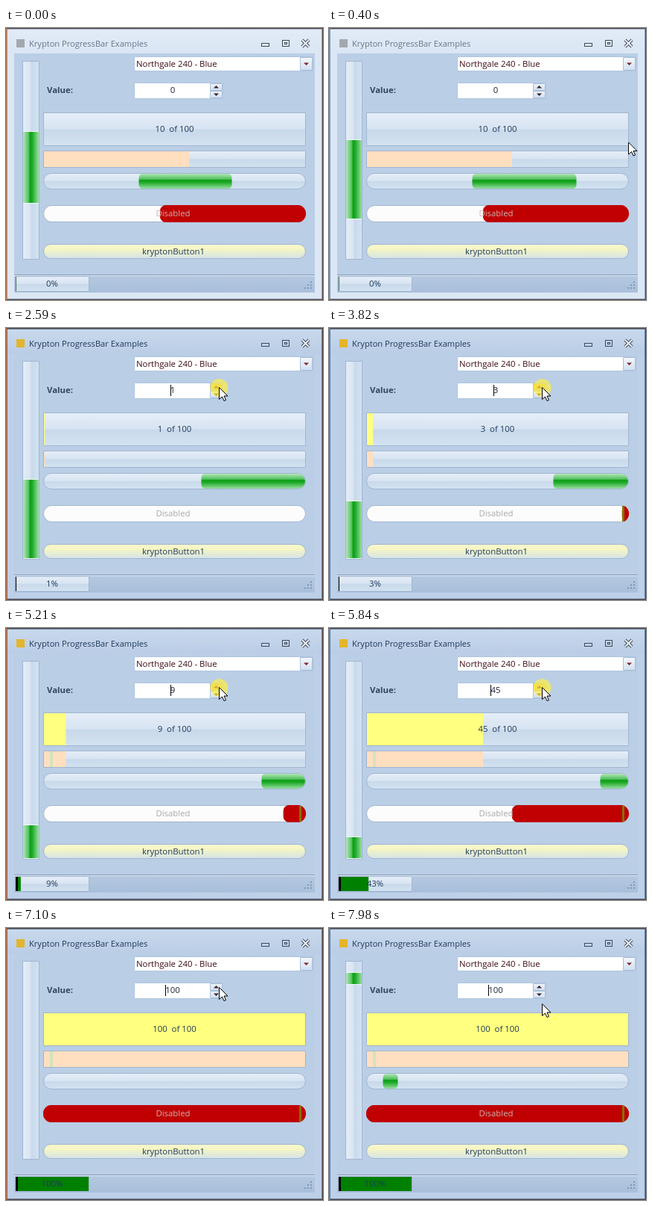
An HTML page with a canvas that plays this animation: 426x364 px, repeating every 8000 ms.

```html
<!DOCTYPE html>
<html lang="en">
<head>
<meta charset="utf-8">
<title>ProgressBar Examples</title>
<style>
html, body { margin: 0; width: 100%; height: 100%; overflow: hidden; }
canvas { display: block; }
</style>
</head>
<body>
<canvas id="stage" width="426" height="364"></canvas>
<script>
const ctx = document.getElementById('stage').getContext('2d');
const LOOP = 8000, PRESS = 2450, RELEASE = 6850;
const FONT = '"Open Sans", "Noto Sans", sans-serif';
const INK = '#1e395b', EDGE = '#a0b6d0';
const GLASS = [[0, '#e6eef8'], [.48, '#d8e4f2'], [.52, '#c8d9eb'], [1, '#d3e3f1']];
const GREEN = [[0, '#c0ecc4'], [.38, '#50c05c'], [.44, '#0e9e18'], [.56, '#18a824'], [1, '#a8e4ae']];

// piecewise linear value of [time, value] points
function track(points, t) {
  if (t <= points[0][0]) return points[0][1];
  for (let i = 1; i < points.length; i++) {
    const [t0, v0] = points[i - 1], [t1, v1] = points[i];
    if (t < t1) return v0 + (v1 - v0) * (t - t0) / (t1 - t0);
  }
  return points[points.length - 1][1];
}

const COUNT = [[PRESS - 1, 0], [PRESS, 1], [3100, 2], [3700, 3], [4250, 4.4], [5180, 9], [5250, 9.2], [6470, 83.5], [6760, 100]];
const MOUSE_X = [[250, 428], [820, 330], [1240, 290], [1700, 286]];
const MOUSE_Y = [[250, 170], [820, 104], [1240, 84], [1500, 76], [1700, 79], [7100, 79], [7700, 101]];
const countAt = t => Math.floor(track(COUNT, t));

function gradient(x, y, w, h, stops, across) {
  const g = across ? ctx.createLinearGradient(x, 0, x + w, 0) : ctx.createLinearGradient(0, y, 0, y + h);
  stops.forEach((s, i) => Array.isArray(s) ? g.addColorStop(...s) : g.addColorStop(i / (stops.length - 1), s));
  return g;
}

function box(x, y, w, h, fill, line, r = 0) {
  ctx.beginPath();
  ctx.roundRect(x + .5, y + .5, w - 1, h - 1, r);
  ctx.fillStyle = fill;
  ctx.fill();
  if (line) { ctx.strokeStyle = line; ctx.stroke(); }
}

function rect(x, y, w, h, fill) {
  ctx.fillStyle = fill;
  ctx.fillRect(x, y, w, h);
}

function text(s, x, y, color = INK, align = 'center', font = '11.4px') {
  ctx.font = `${font} ${FONT}`;
  ctx.textAlign = align;
  ctx.fillStyle = color;
  ctx.fillText(s, x, y);
}

function shape(points, fill, line) {
  ctx.beginPath();
  points.forEach(([x, y]) => ctx.lineTo(x, y));
  ctx.closePath();
  ctx.fillStyle = fill;
  ctx.fill();
  if (line) { ctx.strokeStyle = line; ctx.stroke(); }
}

function arrow(x, y, dir, color) {
  shape([[x - 3.5, y - 1.5 * dir], [x + 3.5, y - 1.5 * dir], [x, y + 2 * dir]], color);
}

// draw clipped to a rounded box
function inside(x, y, w, h, r, draw) {
  ctx.save();
  ctx.beginPath();
  ctx.roundRect(x, y, w, h, r);
  ctx.clip();
  draw();
  ctx.restore();
}

function windowFrame(active) {
  rect(0, 0, 426, 364, '#5c463a');
  rect(0, 0, 1, 364, '#c86c34');
  box(1, 1, 424, 362, active ? '#bdd0e8' : '#dce7f4', active ? '#5f7da5' : '#8ba5c4');
  rect(2, 2, 422, 32, gradient(0, 2, 0, 32, active ? ['#c9d9ec', '#bacde6'] : ['#e2ebf6', '#dae6f4']));
  rect(11, 34, 404, 320, '#bacee6');
  rect(14, 15, 11, 11, active ? '#e3b52c' : '#a3a8ae');
  text('Krypton ProgressBar Examples', 31, 25, active ? INK : '#66768c', 'left', '11.1px');

  ctx.strokeStyle = '#3f4a5c';
  ctx.strokeRect(343.5, 20.5, 10, 4);
  ctx.strokeRect(371.5, 16.5, 9, 8);
  ctx.strokeRect(374.5, 19.5, 3, 2);
  for (const [w, c] of [[4, '#3f4a5c'], [2, '#eef4fa']]) {
    ctx.lineWidth = w;
    ctx.strokeStyle = c;
    ctx.beginPath();
    ctx.moveTo(398, 16); ctx.lineTo(407, 25);
    ctx.moveTo(407, 16); ctx.lineTo(398, 25);
    ctx.stroke();
  }
  ctx.lineWidth = 1;
}

function inputs(count, pressed) {
  box(172, 38, 241, 20, '#fff', '#b1c5df');
  text('Northgale 240 - Blue', 175, 52, '#3c0c14', 'left');
  box(395, 39, 17, 18, gradient(0, 39, 0, 18, ['#f4f8fc', '#cfdff0']), '#a9bfd9');
  arrow(403.5, 48, 1, '#7c2430');

  text('Value:', 55, 87, '#32465e', 'left', 'bold 11.4px');
  box(172, 73, 120, 22, '#fff', '#b1c5df');
  text(count, 224, 87, '#1a2438');
  if (count) rect(Math.round(224 - ctx.measureText(count).width / 2), 76, 1, 15, '#000');
  for (const [y, dir] of [[74, -1], [84, 1]]) {
    const fill = pressed && dir < 0 ? '#e0c050' : gradient(0, y, 0, 10, ['#eff4fa', '#cfddee']);
    box(274, y, 17, 10, fill, '#a9bfd9');
    arrow(282.5, y + 5, dir, '#3a2028');
  }
}

function bars(count, t) {
  const started = count > 0;
  const span = count >= 100 ? 352 : Math.max(0, count * 3.52 - 2.3);
  const fill = started ? span : 195;

  box(50, 113, 353, 45, gradient(0, 113, 0, 45, GLASS), EDGE);
  if (started) rect(51, 114, Math.min(span, 351), 43, '#ffff80');
  text(`${started ? count : 10}  of 100`, 226.5, 139);

  box(50, 164, 353, 23, gradient(0, 164, 0, 23, GLASS), EDGE);
  rect(51, 165, Math.min(fill, 351), 21, '#ffdfbf');
  if (t > 4600) rect(59, 165, 4, 21, '#d3e3bd');

  box(50, 237, 353, 23, '#fcfcfc', EDGE, 11);
  inside(50, 237, 353, 23, 11, () => {
    if (fill > 1.5) box(402 - fill, 237, fill + 8, 23, '#c00000', '#c00000', 7);
    if (t > 3700) rect(394, 238, 3, 21, '#857000');
  });
  text('Disabled', 224.5, 252, fill > 176 ? '#cdb0ae' : '#a9a9a9');

  box(50, 289, 353, 20, gradient(0, 289, 0, 20, ['#f8f8cc', '#f6f6c4', '#e4ecd6', '#d3e2ea']), EDGE, 10);
  text('kryptonButton1', 225, 303);
}

// the tail runs at the marquee value, the head at twice that value
function marquees(t) {
  const step = Math.floor(36.9 + t / 112) % 102;
  const tail = Math.min(1, step / 100), head = Math.min(1, step / 50);
  const left = Math.round(51 + 352 * tail), right = Math.round(51 + 352 * head);
  const top = Math.round(44 + 265 * tail), bottom = Math.round(44 + 265 * head);
  const visible = head > tail;

  box(50, 194, 353, 22, gradient(0, 194, 0, 22, GLASS), EDGE, 11);
  box(22, 44, 23, 266, gradient(22, 0, 23, 0, GLASS, true), EDGE);
  if (!visible) return;
  inside(51, 195, 351, 20, 10, () =>
    box(left, 194, right - left, 22, gradient(0, 194, 0, 22, GREEN), null, 6));
  rect(23, top - 1, 21, bottom - top + 1, '#eef6f4');
  rect(23, top, 21, bottom - top - 1, gradient(22, 0, 23, 0, GREEN, true));
}

function statusBar(count) {
  rect(11, 330, 404, 1, '#8199b8');
  rect(11, 331, 404, 1, '#e4edf7');
  rect(11, 332, 404, 22, gradient(0, 332, 0, 22, ['#b4c8e0', '#a9bfda']));
  box(12, 332, 100, 21, gradient(0, 332, 0, 21, GLASS), EDGE);
  rect(13, 333, count < 100 ? Math.max(0, .98 * count - 2) : 98, 19, '#008000');
  rect(13, 333, count > 4 ? 3 : 1, 19, count ? '#000' : '#4a7a5c');
  text(`${count}%`, 62, 346);
  for (let i = 0; i < 3; i++)
    for (let j = 0; j <= i; j++) rect(409 - 4 * j, 339 + 4 * i, 2, 2, '#8099b8');
}

function pointer(t, pressed) {
  const x = track(MOUSE_X, t), y = track(MOUSE_Y, t);
  if (pressed) {
    ctx.beginPath();
    ctx.arc(x + .5, y + 1, 12, 0, 7);
    ctx.fillStyle = 'rgba(255,238,70,.7)';
    ctx.fill();
  }
  const outline = [[0, 0], [0, 16], [4, 12.5], [6.5, 18], [9, 17], [6.5, 11.5], [11.5, 11.5]];
  shape(outline.map(([a, b]) => [x + .5 + a, y + .5 + b]), '#fff', '#000');
}

function draw(now) {
  const t = now % LOOP;
  const count = countAt(t);
  const pressed = t >= PRESS && t < RELEASE;
  windowFrame(t >= PRESS);
  inputs(count, pressed);
  bars(count, t);
  marquees(t);
  statusBar(countAt(t - 20));
  pointer(t, pressed);
  requestAnimationFrame(draw);
}
requestAnimationFrame(draw);
</script>
</body>
</html>
```
